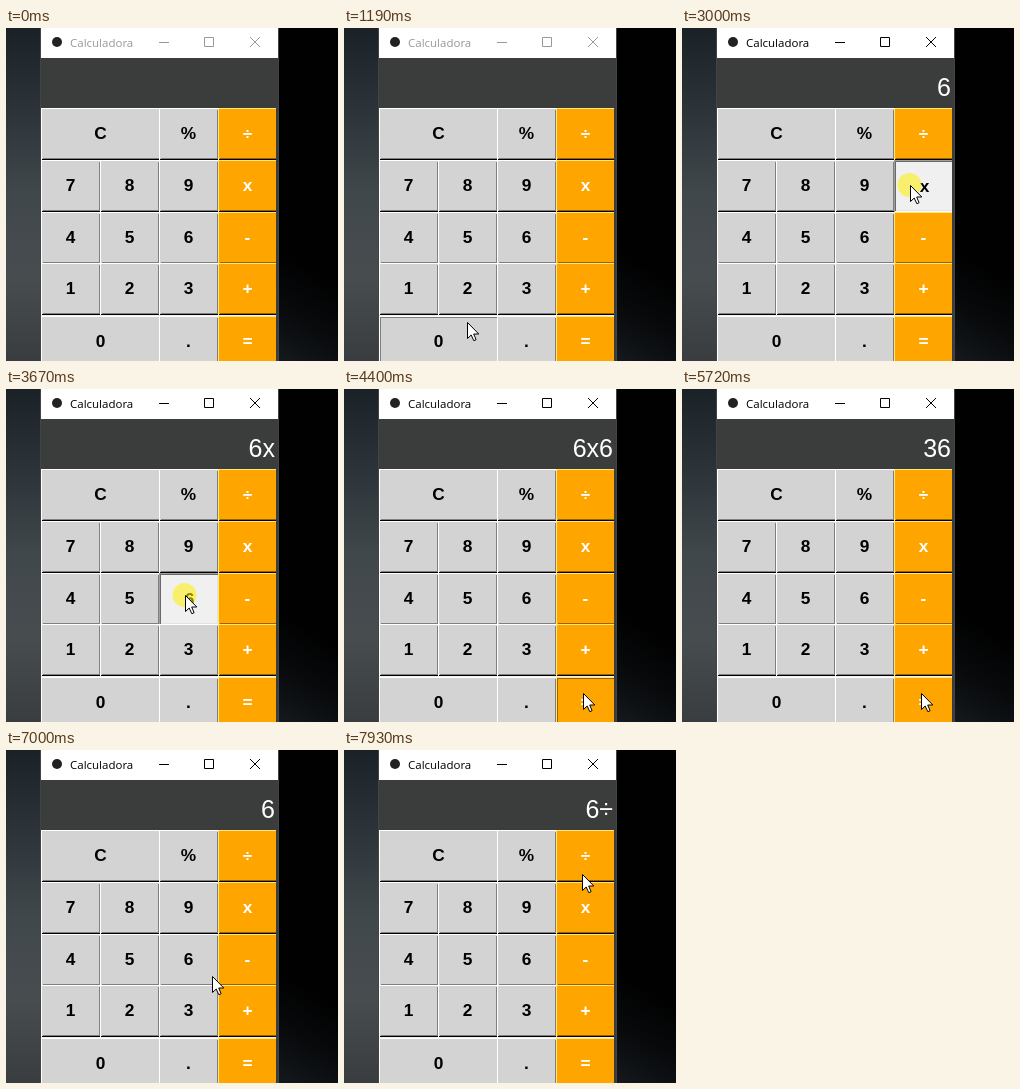
Write an HTML page with a canvas that moves like this. It is 332 px wide and 333 px high and loops after 8000 ms.

```html
<!DOCTYPE html>
<html lang="pt">
<head>
<meta charset="utf-8">
<title>Calculadora</title>
<style>
  html, body { margin: 0; width: 100%; height: 100%; overflow: hidden; background: #000; }
  canvas { display: block; }
</style>
</head>
<body>
<canvas id="stage" width="332" height="333"></canvas>
<script>
const ctx = document.getElementById('stage').getContext('2d');
const LOOP = 8000, TICK = 1000 / 15, HOLD = 2;
const SANS = '"Liberation Sans", Arial, sans-serif';

const gray = { face: '#d3d3d3', light: '#fff', dark: '#7f7f7f', ink: '#000' };
const orange = { face: '#ffa500', light: '#ffe77f', dark: '#996300', ink: '#fff' };

// A repeated label makes one button two columns wide
const rowTops = [80, 132, 184, 235, 288];
const buttons = ['CC%÷', '789x', '456-', '123+', '00.='].flatMap((labels, row) =>
  [...new Set(labels)].map(label => {
    const column = labels.indexOf(label);
    const span = labels.lastIndexOf(label) - column + 1;
    return {
      label, x: 35 + 59 * column, y: rowTops[row], w: 60 * span, h: 52,
      tone: column === 3 ? orange : gray
    };
  }));

// The cursor reaches a button at one tick, may press it, and leaves; dx, dy are from its centre
function visit(label, arrive, { press, leave = press ? press + HOLD : arrive, dx = -4, dy = -4 } = {}) {
  const { x, y, w, h } = buttons.find(b => b.label === label);
  return { label, arrive, press, leave, x: x + w / 2 + dx, y: y + h / 2 + dy };
}

const visits = [
  visit('0', 16, { dx: 40 }),
  visit('4', 20, { leave: 23 }),
  visit('2', 29, { dx: -16, dy: 12 }),
  visit('6', 36, { press: 37 }),
  visit('x', 43, { press: 45, dx: -14, dy: -1 }),
  visit('6', 51, { press: 54 }),
  visit('=', 66, { press: 76, leave: 85, dx: -3, dy: -10 }),
  visit('C', 91, { press: 92, dx: 4 }),
  visit('9', 97),
  visit('6', 100, { press: 101 }),
  visit('+', 107, { dx: -9, dy: -15 }),
  visit('x', 110),
  visit('÷', 111, { press: 112, leave: 116, dy: -3 }),
  visit('÷', 119, { leave: 120, dy: 18 })
];
const presses = visits.filter(v => v.press);

function typeKey(reading, key) {
  if (key === 'C') return '';
  if (key === '=') return String(reading.split('x').reduce((a, b) => a * b));
  return reading + key;
}

function cursorAt(tick) {
  const i = visits.findLastIndex(v => tick >= v.arrive);
  if (i < 0) return null;
  const from = visits[i], to = visits[i + 1] || from;
  const k = tick > from.leave ? (tick - from.leave) / (to.arrive - from.leave) : 0;
  const ease = k * k * (3 - 2 * k);
  return {
    x: Math.round(from.x + (to.x - from.x) * ease),
    y: Math.round(from.y + (to.y - from.y) * ease)
  };
}

function rect(x, y, w, h, color) {
  ctx.fillStyle = color;
  ctx.fillRect(x, y, w, h);
}

function disc(x, y, r, color) {
  ctx.fillStyle = color;
  ctx.beginPath();
  ctx.arc(x, y, r, 0, 7);
  ctx.fill();
}

function text(string, x, y, font, color, align) {
  ctx.font = font;
  ctx.fillStyle = color;
  ctx.textAlign = align;
  ctx.fillText(string, x, y);
}

function gradient(x0, y0, x1, y1, ...colors) {
  const g = ctx.createLinearGradient(x0, y0, x1, y1);
  colors.forEach((color, i) => g.addColorStop(i / (colors.length - 1), color));
  return g;
}

function drawDesktop() {
  rect(0, 0, 35, 333, gradient(0, 0, 0, 333, '#1a2227', '#2c3439', '#41484c', '#474c4f', '#393d40'));
  rect(272, 0, 60, 333, gradient(272, 333, 322, 250, '#15191d', '#080a0c', '#010101'));
}

function drawTitleBar(active) {
  const ink = active ? '#000' : '#999';
  rect(35, 0, 237, 30, '#fff');
  disc(51, 14, 5, '#222');
  text('Calculadora', 64, 19, '11.5px "Open Sans", "Noto Sans", sans-serif', ink, 'left');
  ctx.strokeStyle = ink;
  ctx.lineWidth = 1;
  ctx.stroke(new Path2D('M153 14.5H163M198.5 9.5h9v9h-9zM244 9l10 10M254 9l-10 10'));
}

// One-pixel frame: top and left in one colour, bottom and right in another
function bevel({ x, y, w, h }, inset, topLeft, bottomRight) {
  const l = x + inset, t = y + inset, fw = w - 2 * inset, fh = h - 2 * inset;
  rect(l, t + fh - 1, fw, 1, bottomRight);
  rect(l + fw - 1, t, 1, fh, bottomRight);
  rect(l, t, fw, 1, topLeft);
  rect(l, t, 1, fh, topLeft);
}

function drawButton(b, ridged, pressed) {
  const { face, light, dark, ink } = b.tone;
  rect(b.x, b.y, b.w, b.h, pressed ? '#f0f0f0' : face);
  if (pressed) {
    bevel(b, 0, '#a0a0a0', '#fff');
    bevel(b, 1, '#696969', '#e3e3e3');
  } else if (ridged) {
    bevel(b, 0, light, dark);
    bevel(b, 1, dark, light);
  } else {
    bevel(b, 0, light, '#000');
    bevel(b, 1, face, dark);
  }
  const shift = pressed ? 0.5 : -0.5;
  text(b.label, b.x + b.w / 2 + shift, b.y + 31.5 + shift,
    `bold 17.3px ${SANS}`, pressed ? '#000' : ink, 'center');
}

function drawCursor({ x, y }, pressed) {
  if (pressed) disc(x - 0.5, y, 12, 'rgba(255,240,0,.55)');
  ctx.save();
  ctx.translate(x + 0.5, y + 0.5);
  const arrow = new Path2D('M0 0V16L3.7 12.5L6.3 18.2L8.6 17.2L6.2 11.5H11.3Z');
  ctx.fillStyle = '#fff';
  ctx.fill(arrow);
  ctx.strokeStyle = '#000';
  ctx.stroke(arrow);
  ctx.restore();
}

function draw(tick) {
  const cursor = cursorAt(tick);
  const hovered = cursor && buttons.findLast(b =>
    cursor.x >= b.x && cursor.x < b.x + b.w && cursor.y >= b.y && cursor.y < b.y + b.h);
  const lastPress = presses.findLast(p => tick >= p.press);
  const pressed = Boolean(lastPress) && tick < lastPress.press + HOLD;
  const reading = presses.filter(p => tick >= p.press + HOLD).reduce((r, p) => typeKey(r, p.label), '');

  drawDesktop();
  rect(34, 0, 239, 333, '#444');
  drawTitleBar(Boolean(lastPress));
  rect(35, 30, 237, 303, '#3b3c3c');
  text(reading, 269, 68, `25px ${SANS}`, '#fff', 'right');

  ctx.save();
  ctx.beginPath();
  ctx.rect(35, 80, 235, 253);
  ctx.clip();
  rect(35, 80, 235, 253, '#f0f0f0');
  for (const b of buttons) {
    // A clicked button stays raised until the cursor leaves it
    const clicked = lastPress && lastPress.label === b.label;
    drawButton(b, b === hovered && !clicked, pressed && clicked);
  }
  ctx.restore();
  if (cursor) drawCursor(cursor, pressed);
}

function frame() {
  // The small lead keeps rounded-down step times on the right tick
  draw(Math.floor((performance.now() % LOOP + 7) / TICK) % 120);
  requestAnimationFrame(frame);
}
frame();
</script>
</body>
</html>
```
